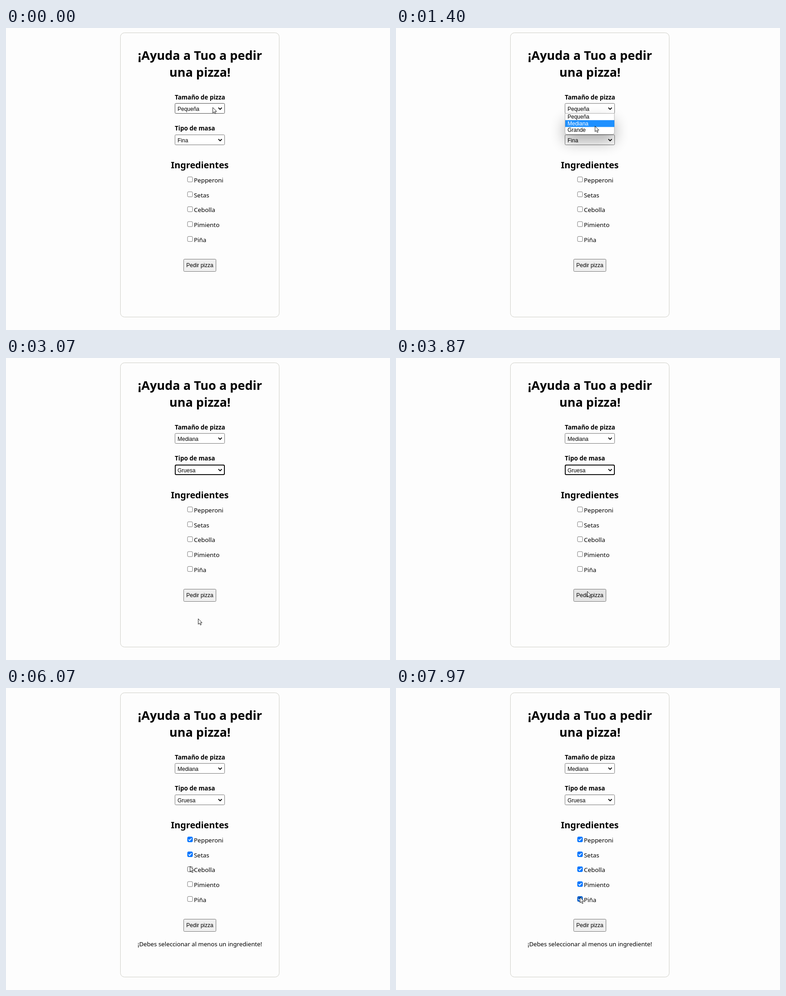
Recreate the animation shown at these times as an HTML page. Size 844 by 663 pixels, loop 8000 ms.

```html
<!DOCTYPE html>
<html lang="es">
<head>
<meta charset="utf-8">
<title>Pedir pizza</title>
<style>
  html, body { margin: 0; width: 100%; height: 100%; overflow: hidden; background: #fdfdfd; }
  svg { display: block; width: 844px; height: 663px; font: 13.4px "Noto Sans", "Open Sans", sans-serif; }
  text { white-space: pre; }
  .bold { font-weight: 700; }
  .mid { text-anchor: middle; }
  .ui { font: 12px "Liberation Sans", Arial, sans-serif; }
</style>
</head>
<body>
<svg id="stage" viewBox="0 0 844 663">
  <defs>
    <filter id="blur" x="-60%" y="-130%" width="220%" height="360%">
      <feGaussianBlur stdDeviation="16"/>
    </filter>
  </defs>
  <rect width="844" height="663" fill="#fdfdfd"/>
</svg>
<script>
const LOOP = 8000;
const stage = document.getElementById('stage');

function add(tag, attrs, parent = stage, text = '') {
  const el = document.createElementNS('http://www.w3.org/2000/svg', tag);
  for (const key in attrs) el.setAttribute(key, attrs[key]);
  el.textContent = text;
  parent.appendChild(el);
  return el;
}

const label = (x, y, text, attrs = {}, parent = stage) => add('text', { x, y, ...attrs }, parent, text);
const box = (x, y, width, height, rx, attrs, parent = stage) =>
  add('rect', { x, y, width, height, rx, ...attrs }, parent);
const show = (el, on) => el.setAttribute('visibility', on ? 'visible' : 'hidden');

function makeSelect(y, options) {
  const frame = box(371.5, y, 109, 22, 2, { fill: '#fff', stroke: '#767676' });
  const ring = box(372, y + 0.5, 108, 21, 2.5, { fill: 'none', stroke: '#101010', 'stroke-width': 2 });
  const value = label(377, y + 16, '', { class: 'ui' });
  add('path', { d: `M466.8 ${y + 9.4}l3.8 3.8 3.8-3.8`, fill: 'none', stroke: '#000', 'stroke-width': 1.9 });
  return { y, options, frame, ring, value };
}

function makeMenu({ y, options }) {
  const top = y + 22;
  const group = add('g', {});
  box(371, top + 16, 109, 46, 5, { fill: '#000', opacity: 0.32, filter: 'url(#blur)' }, group);
  add('path', {
    d: `M371.5 ${top}h108.5v41q0 5-5 5h-98.500q-5 0-5-5z`, fill: '#fff', stroke: '#b0b0b0'
  }, group);
  const bar = box(372, top, 108, 15, 0, { fill: '#1e90ff' }, group);
  const rows = options.map((text, i) =>
    label(377, top + 11.3 + i * 14.8, text, { class: 'ui' }, group));
  return { top, group, bar, rows };
}

function makeCheck(text, i) {
  const y = 326.9 + i * 32.7;
  label(413, y + 12.1, text);
  const frame = box(399, y, 11, 11, 2, {});
  const tick = add('path', {
    d: `M401.3 ${y + 5.7}l2.3 2.4 4.2-5`, fill: 'none', stroke: '#fff', 'stroke-width': 1.8
  });
  return { y, frame, tick };
}

// Card and form
box(251.5, 10.5, 349, 624, 9, { fill: 'none', stroke: '#cfcfc8' });
const title = { class: 'bold mid', 'font-size': 27 };
label(426.3, 69.5, '¡Ayuda a Tuo a pedir', title);
label(426.3, 107, 'una pizza!', title);
const small = { class: 'bold', 'font-size': 13.45 };
label(371, 157, 'Tamaño de pizza', small);
label(371, 225, 'Tipo de masa', small);
label(426, 307.5, 'Ingredientes', { class: 'bold mid', 'font-size': 19.8 });

const size = makeSelect(165.5, ['Pequeña', 'Mediana', 'Grande']);
const dough = makeSelect(234.5, ['Fina', 'Gruesa', 'Pan']);
const checks = ['Pepperoni', 'Setas', 'Cebolla', 'Pimiento', 'Piña'].map(makeCheck);
const button = box(390.5, 507.5, 71, 27, 2, { stroke: '#767676' });
label(426, 525.3, 'Pedir pizza', { class: 'ui mid' });
const warning = label(426, 566.7, '¡Debes seleccionar al menos un ingrediente!',
  { class: 'mid', 'font-size': 13.2 });
const sizeMenu = makeMenu(size);
const doughMenu = makeMenu(dough);

// Pointers, drawn with the hot spot at 0,0
const arrow = add('path', {
  d: 'M.5.5V12.600L3.300 10 5.200 14.300 7.200 13.400 5.300 9.200H9z',
  fill: '#fff', stroke: '#111', 'stroke-width': 0.95
});
const beam = add('path', {
  d: 'M-2.500-6.500H-.5L0-6 .5-6.500H2.500M0-6V6M-2.500 6.500H-.5L0 6 .5 6.500H2.500',
  fill: 'none', stroke: '#222'
});

// Pointer stops: time, x, y
const path = [
  [0, 454, 174], [600, 454, 174], [1350, 437, 215], [1560, 437, 215],
  [1900, 428, 245], [2020, 428, 245], [2250, 415, 281], [2480, 415, 282],
  [3050, 422, 572], [3250, 422, 572], [3700, 420, 512], [4120, 420, 512],
  [4670, 408, 313], [4900, 404, 326], [5200, 404, 326], [5450, 404, 359],
  [5700, 404, 359], [5950, 404, 391], [6300, 404, 391], [6600, 404, 424],
  [6900, 404, 425], [7250, 404, 459], [8000, 404, 459]
];
const opened = { size: [500, 1540], dough: [1950, 2440] };
const clickTimes = [5080, 5600, 6180, 6780, 7440];
const orderTime = 4000;

function pointerAt(t) {
  const i = Math.max(1, path.findIndex(p => p[0] > t));
  const [t0, x0, y0] = path[i - 1], [t1, x1, y1] = path[i];
  const k = (t - t0) / (t1 - t0), e = k * k * (3 - 2 * k);
  return [x0 + (x1 - x0) * e, y0 + (y1 - y0) * e];
}

function drawSelect(select, menu, [from, to], blurAt, t, y) {
  const open = t >= from && t < to;
  select.value.textContent = select.options[t >= to ? 1 : 0];
  select.frame.setAttribute('stroke', y > select.y && y < select.y + 22 ? '#4f4f4f' : '#767676');
  show(select.ring, t >= to && t < blurAt);
  show(menu.group, open);
  const row = Math.max(0, Math.min(2, Math.floor((y - menu.top) / 14.8)));
  menu.bar.setAttribute('y', menu.top + row * 14.8);
  menu.rows.forEach((el, i) => el.setAttribute('fill', i === row ? '#fff' : '#000'));
  return open;
}

function draw(t) {
  const [x, y] = pointerAt(t);
  const sizeOpen = drawSelect(size, sizeMenu, opened.size, opened.dough[0], t, y);
  const doughOpen = drawSelect(dough, doughMenu, opened.dough, orderTime, t, y);

  checks.forEach((c, i) => {
    const on = t >= clickTimes[i];
    const hover = x > 398 && x < 411 && y > c.y - 1.5 && y < c.y + 12;
    c.frame.setAttribute('fill', on ? (hover ? '#005cc8' : '#0075ff') : '#fff');
    c.frame.setAttribute('stroke', on ? (hover ? '#005cc8' : '#0075ff') : (hover ? '#4f4f4f' : '#767676'));
    show(c.tick, on);
  });

  const over = y > 507 && y < 535;
  button.setAttribute('fill', over ? '#e5e5e5' : '#efefef');
  show(warning, t >= orderTime);

  const onText = y > 291 && y < 319 && !sizeOpen && !doughOpen;
  show(arrow, !onText);
  show(beam, onText);
  const place = `translate(${Math.round(x)} ${Math.round(y)})`;
  arrow.setAttribute('transform', place);
  beam.setAttribute('transform', place);
}

const start = performance.now();
function tick(now) {
  draw(Math.max(0, now - start) % LOOP);
  requestAnimationFrame(tick);
}
draw(0);
requestAnimationFrame(tick);
</script>
</body>
</html>
```
